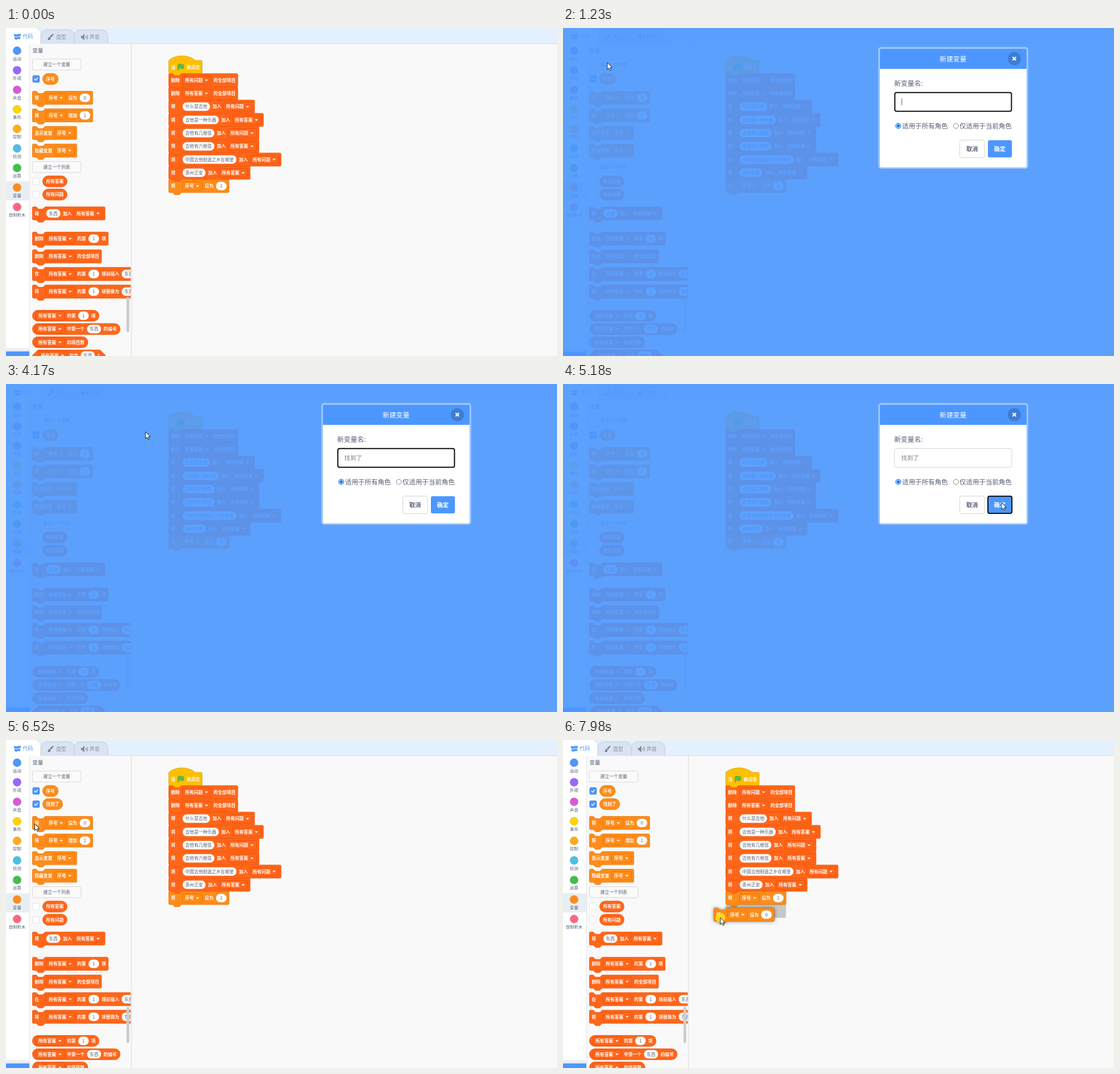
Write an HTML page with a canvas that moves like this. It is 970x578 px and loops after 8000 ms.

```html
<!DOCTYPE html>
<html lang="zh">
<head>
<meta charset="utf-8">
<style>
html, body { margin: 0; width: 100%; height: 100%; overflow: hidden; background: #f9f9f9; }
canvas { display: block; }
</style>
</head>
<body>
<canvas id="stage" width="970" height="578"></canvas>
<script>
const ctx = document.getElementById('stage').getContext('2d');
const CJK = '"Noto Sans CJK SC", "Noto Sans", sans-serif';
const MONO = '"Noto Sans Mono CJK SC", "Noto Sans CJK SC", monospace';
const LOOP = 8000;
const U = 0.4854;            // pixels per block unit
const FONT = 7.77, GAP = 4, ROW = 23.3;
const BLUE = '#4c97ff', INK = '#575e75';
const VAR = ['#ff8c1a', '#db6e00'], LIST = ['#ff661a', '#e64d00'], EVENT = ['#ffbf00', '#cc9900'];

// Moments of the story, in ms
const OPEN = 1230, COMMIT = 3650, CONFIRM = 5030, CLOSE = 5260, GRAB = 7310, DRAG = 7362;

// ---- drawing helpers ----
function setFont(size, weight = 400, family = CJK) {
  ctx.font = `${weight} ${size}px ${family}`;
}

function text(s, x, cy, size, color, { weight = 400, align = 'left', family = CJK } = {}) {
  setFont(size, weight, family);
  ctx.textAlign = align;
  ctx.fillStyle = color;
  ctx.fillText(s, x, cy + size * 0.37);
}

function paint(path, fill, stroke, width = 1) {
  if (fill) { ctx.fillStyle = fill; ctx.fill(path); }
  if (stroke) { ctx.strokeStyle = stroke; ctx.lineWidth = width; ctx.stroke(path); }
}

function rect(x, y, w, h, color) {
  ctx.fillStyle = color;
  ctx.fillRect(x, y, w, h);
}

function box(x, y, w, h, r, fill, stroke, width) {
  const p = new Path2D();
  p.roundRect(x, y, w, h, r);
  paint(p, fill, stroke, width);
}

function disc(x, y, r, fill, stroke, width) {
  const p = new Path2D();
  p.arc(x, y, r, 0, 7);
  paint(p, fill, stroke, width);
}

function icon(x, y, d, fill, stroke, width) {
  ctx.save();
  ctx.translate(x, y);
  paint(new Path2D(d), fill, stroke, width);
  ctx.restore();
}

function clipped(x, y, w, h, draw) {
  ctx.save();
  ctx.beginPath();
  ctx.rect(x, y, w, h);
  ctx.clip();
  draw();
  ctx.restore();
}

// ---- blocks ----
function shape(kind, w) {
  if (kind === 'pill') return `M20 4H${w - 20}a20 20 0 0 1 0 40H20a20 20 0 0 1 0-40z`;
  if (kind === 'hex') return `M20 4H${w - 20}l20 20l-20 20H20l-20-20z`;
  const top = kind === 'hat'
    ? 'M0 0c25-22 71-22 96 0'
    : 'M0 4a4 4 0 0 1 4-4H12c2 0 3 1 4 2l4 4c1 1 2 2 4 2h12c2 0 3-1 4-2l4-4c1-1 2-2 4-2';
  return `${top}H${w - 4}a4 4 0 0 1 4 4v40a4 4 0 0 1-4 4H48c-2 0-3 1-4 2l-4 4c-1 1-2 2-4 2` +
    'h-12c-2 0-3-1-4-2l-4-4c-1-1-2-2-4-2H4a4 4 0 0 1-4-4z';
}

function outline(kind, x, cy, w, fill, stroke, shadow) {
  ctx.save();
  ctx.translate(x, cy - ROW / 2);
  ctx.scale(U, U);
  if (shadow) { ctx.shadowColor = 'rgba(0,0,0,.55)'; ctx.shadowBlur = 6; }
  const p = new Path2D(shape(kind, w / U));
  paint(p, fill);
  ctx.shadowColor = 'transparent';
  paint(p, null, stroke, 1.4);
  ctx.restore();
}

// Spec tokens: plain label, [dropdown], (input), or ⚑ for the flag.
function block(x, cy, spec, [fill, stroke], kind = 'stack', shadow = false) {
  const pad = { pill: 6, hex: 10.5 }[kind] || GAP;
  setFont(FONT, 700);
  let cx = x + pad;
  const items = spec.split(' ').map((token, i) => {
    const type = '[(⚑'.includes(token[0]) ? token[0] : '';
    const label = type ? token.slice(1, -1) : token;
    const tw = ctx.measureText(label).width;
    const w = type === '[' ? tw + 19.6 : type === '(' ? Math.max(19.4, tw + 10) : type ? 11.65 : tw;
    if (i === 1 && kind === 'stack') cx = Math.max(cx, x + 24.1);
    const item = { type, label, x: cx, w };
    cx += w + GAP;
    return item;
  });
  outline(kind, x, cy, cx - GAP + pad - x, fill, stroke, shadow);
  for (const it of items) {
    if (it.type === '[') {
      box(it.x, cy - 7.75, it.w, 15.5, 2, null, stroke, 0.7);
      text(it.label, it.x + 4.6, cy, FONT, '#fff', { weight: 700 });
      icon(it.x + it.w - 8.3, cy, 'M-2.8-1.2h5.6l-2.8 3z', '#fff');
    } else if (it.type === '(') {
      box(it.x, cy - 7.75, it.w, 15.5, 7.75, '#fff', stroke, 0.5);
      text(it.label, it.x + it.w / 2, cy, FONT, INK, { weight: 500, align: 'center' });
    } else if (it.type) {
      icon(it.x, cy, 'M1.5-4.5c3-2 5 2 9 0v7c-4 2-6-2-9 0v3h-1v-10z', '#4cbf56', '#45993d', 0.6);
    } else {
      text(it.label, it.x, cy, FONT, '#fff', { weight: 700 });
    }
  }
}

// ---- editor ----
const CATEGORIES = [['运动', BLUE], ['外观', '#9966ff'], ['声音', '#d65cd6'], ['事件', '#ffd500'],
  ['控制', '#ffab19'], ['侦测', '#4cbfe6'], ['运算', '#40bf4a'], ['变量', '#ff8c1a'], ['自制积木', '#ff6680']];

const SCRIPT = ['删除 [所有问题] 的全部项目', '删除 [所有答案] 的全部项目',
  '将 (什么是吉他) 加入 [所有问题]', '将 (吉他是一种乐器) 加入 [所有答案]',
  '将 (吉他有几根弦) 加入 [所有问题]', '将 (吉他有六根弦) 加入 [所有答案]',
  '将 (中国吉他制造之乡在哪里) 加入 [所有问题]', '将 (贵州正安) 加入 [所有答案]'];

const SET_VAR = '将 [序号] 设为 (0)';
const PALETTE = [
  [123, SET_VAR, VAR], [154, '将 [序号] 增加 (1)', VAR],
  [185, '显示变量 [序号]', VAR], [216, '隐藏变量 [序号]', VAR],
  [326.7, '将 (东西) 加入 [所有答案]', LIST], [371.2, '删除 [所有答案] 的第 (1) 项', LIST],
  [402.5, '删除 [所有答案] 的全部项目', LIST],
  [433.5, '在 [所有答案] 的第 (1) 项前插入 (东西)', LIST],
  [464.5, '将 [所有答案] 的第 (1) 项替换为 (东西)', LIST],
  [507, '[所有答案] 的第 (1) 项', LIST, 'pill'], [530.5, '[所有答案] 中第一个 (东西) 的编号', LIST, 'pill'],
  [553.7, '[所有答案] 的项目数', LIST, 'pill'], [577, '[所有答案] 包含 (东西) ?', LIST, 'hex']];

const SCRIPT_X = 286.5, SCRIPT_Y = 92, PALETTE_X = 46.5;

function drawTabs() {
  rect(0, 0, 970, 27, '#e5f0ff');
  rect(41, 27, 929, 1, '#d3dbe6');
  box(120.5, 3, 59, 30, [11, 11, 0, 0], '#d9e3f2', '#c5cedc');
  box(61.5, 3, 59, 30, [11, 11, 0, 0], '#d9e3f2', '#c5cedc');
  box(-12, -1, 73, 34, [0, 11, 0, 0], '#fff', '#d3dbe6');
  text('代码', 29.5, 14.5, 9, BLUE, { weight: 500 });
  text('造型', 88, 15.5, 9, '#878d9e', { weight: 500 });
  text('声音', 147, 15.5, 9, '#878d9e', { weight: 500 });
  icon(14, 9.5, 'M0 1h2l1 1h2l1-1h6v4H6l-1 1H3L2 5H0zM2 6l1 1h2l1-1h5v4H6l-1 1H3l-1-1H1V6z', BLUE);
  icon(73, 10, 'M10 0l1 1-5 6-2-2zM3.5 6l2 2c0 3-3 3.5-5.5 2.5 2-1 1-4 3.5-4.5z', '#6d7387');
  icon(132, 10, 'M0 4h2l4-4v12l-4-4H0z', '#878d9e');
  icon(132, 10, 'M8 4q1.5 2 0 4M10 2q3 4 0 8', null, '#878d9e', 1.2);
}

function drawCategories() {
  rect(0, 27, 41, 551, '#fff');
  rect(0, 270, 41, 34, '#e9eef2');
  CATEGORIES.forEach(([name, color], i) => {
    const y = 40 + i * 34.44;
    disc(19.5, y, 7.2, color, 'rgba(0,0,0,.18)', 0.7);
    text(name, 19.5, y + 14, 7.4, INK, { align: 'center' });
  });
  const fade = ctx.createLinearGradient(0, 561, 0, 570);
  fade.addColorStop(0, '#fff');
  fade.addColorStop(1, '#dce6f4');
  rect(0, 561, 41, 9, fade);
  rect(0, 570, 41, 8, BLUE);
  rect(41, 28, 0.8, 550, '#e0e0e0');
}

function variable(y, name, colors, checked) {
  box(47, y - 6, 12, 12, 2, checked ? BLUE : '#fff', checked ? '#3d79cc' : '#d9d9d9', 0.7);
  if (checked) icon(53, y, 'M-3 0l2 2.2L3-2', null, '#fff', 1.4);
  block(64.5, y, name, colors, 'pill');
}

function paletteButton(cy, label) {
  box(PALETTE_X, cy - 9.7, 85.5, 19.4, 2, '#fafafa', '#d4d4d4', 0.9);
  text(label, 89.3, cy, 7.9, INK, { align: 'center' });
}

function drawPalette(created) {
  clipped(42, 28, 177.5, 550, () => {
    text('变量', PALETTE_X, 39, 9.5, INK, { weight: 500 });
    paletteButton(64.5, '建立一个变量');
    variable(89.8, '序号', VAR, true);
    if (created) {
      variable(113, '找到了', VAR, true);
      ctx.translate(0, 23.2);
    }
    paletteButton(245, '建立一个列表');
    variable(270.3, '所有答案', LIST, false);
    variable(293.5, '所有问题', LIST, false);
    for (const [y, spec, colors, kind] of PALETTE) block(PALETTE_X, y, spec, colors, kind);
  });
  box(212, created ? 470 : 474, 5, created ? 64 : 62, 2.5, '#cecdce');
  rect(220.3, 28, 1, 550, '#d9d9d9');
}

function drawWorkspace() {
  rect(0, 0, 970, 578, '#f9f9f9');
  for (let x = 232; x < 970; x += 19.4)
    for (let y = 46; y < 578; y += 19.4) rect(Math.round(x), Math.round(y), 1, 1, '#f1f1f1');
  block(SCRIPT_X, SCRIPT_Y - ROW, '当 ⚑ 被点击', EVENT, 'hat');
  SCRIPT.forEach((spec, i) => block(SCRIPT_X, SCRIPT_Y + i * ROW, spec, LIST));
  block(SCRIPT_X, SCRIPT_Y + 8 * ROW, '将 [序号] 设为 (1)', VAR);
}

// ---- dialog ----
const TYPING = [
  [2570, 'z', '在 自 子 做 总'], [2800, 'zh', '这 中国 至 只 真的'],
  [2940, 'zha', '扎 炸 咋 渣 乍'], [3100, 'zhao', '找 照 招 着 兆'],
  [3180, "zhao'd", '找到 找的 招待 找点 找打'], [3250, "zhao'da", '找打 招打 找大 照搭 找答'],
  [3330, "zhao'dao", '找到 照到 招到 找道 着道'], [3480, "zhao'dao'l", '找到了 找到啦 找到 照到 招到'],
  [3560, "zhao'dao'le", '找到了 照到了 找到 照到 招到']];

function drawCandidates([, letters, words]) {
  const size = 11.3;
  const spots = [];
  let x = 603;
  for (const word of words.split(' ')) {
    spots.push([x, word]);
    x += (word.length + 1) * size + 10;
  }
  const right = x + 39;
  box(596.5, 136.5, right - 597, 39, 0, '#fff', '#b9bec8');
  rect(597, 155, right - 598, 1, '#e2e5ea');
  text(letters, 603, 146, 12, '#1a63b8', { weight: 700, family: '"Liberation Sans", sans-serif' });
  rect(604 + ctx.measureText(letters).width, 140, 1, 13, '#e33');
  spots.forEach(([sx, word], i) =>
    text(`${i + 1}.${word}`, sx, 166, size, i ? '#1283dd' : '#f01818', { family: MONO }));
  icon(right - 34, 166, 'M2-3l-3 3 3 3', null, '#bbb');
  icon(right - 23, 166, 'M-2-3l3 3-3 3', null, '#e8502e', 1.5);
  icon(right - 10, 166, 'M-3-1.5l3 3 3-3', null, '#e8502e', 1.5);
  disc(right - 11, 147, 10.5, '#f47a55');
}

function drawDialog(t) {
  const onButton = t >= CONFIRM;
  const entry = TYPING.filter(([at]) => t >= at).pop();
  const composing = entry && t < COMMIT;
  rect(0, 0, 970, 578, 'rgba(76,151,255,.9)');
  box(555, 33.5, 264, 214.5, 5, 'rgba(255,255,255,.4)');
  box(558, 36.5, 258, 209, 2, '#fff');
  box(558, 36.5, 258, 35.5, [2, 2, 0, 0], BLUE);
  text('新建变量', 686.7, 55, 11.8, '#fff', { weight: 500, align: 'center' });
  disc(794.5, 54, 11.6, '#3f7dd1');
  icon(794.5, 54, 'M-3-3L3 3M3-3L-3 3', null, '#fff', 2.2);
  text('新变量名:', 583, 97.5, 11.8, INK);

  if (onButton) box(583.5, 113.5, 206.5, 33.5, 3, '#fff', '#d4d4d4');
  else box(584.2, 113.7, 205.3, 33, 3, '#fff', '#101010', 2);
  const value = composing ? entry[1].replaceAll("'", '') : entry ? '找到了' : '';
  text(value, 595.5, 130.3, 10.4, '#7b8090');
  const blinkOff = (t >= 1690 && t < 2240) || (t >= 4170 && t < 4700) || onButton;
  if (!blinkOff) rect(Math.round(595.5 + ctx.measureText(value).width), 124, 1, 12, '#666');

  disc(590.2, 172.5, 4.4, '#fff', '#0b72e0', 1.2);
  disc(590.2, 172.5, 2.7, '#0b72e0');
  text('适用于所有角色', 597, 172.7, 11.5, INK);
  disc(691.6, 172.5, 4.4, '#fff', '#777', 0.9);
  text('仅适用于当前角色', 698, 172.7, 11.5, INK);
  box(698.5, 197.5, 43.5, 31, 3, '#fff', '#d4d4d4');
  text('取消', 720.2, 213, 10.2, INK, { weight: 700, align: 'center' });
  box(748, 197.7, 42.3, 30.3, 3, BLUE, onButton && '#101010', 2);
  text('确定', 769, 213, 10.2, '#fff', { weight: 700, align: 'center' });
  if (composing) drawCandidates(entry);
}

// ---- pointer ----
const smooth = u => u * u * (3 - 2 * u);
const arrive = u => 1 - (1 - u) ** 1.6;
const settle = u => (1 - Math.exp(-2.07 * u)) / (1 - Math.exp(-2.07));

// Each move follows one Bézier curve, captured in a number of held steps.
const MOVES = [
  { start: 460, end: 930, steps: 7, ease: arrive, points: [[-8, 325], [10, 250], [60, 60], [82, 0], [78, 61]] },
  { start: 1540, end: 1690, steps: 3, ease: smooth, points: [[78, 61], [250, 99]] },
  { start: 4170, end: 4950, steps: 11, ease: smooth, points: [[250, 99], [185, -68], [640, -20], [870, 320], [772, 209]] },
  { start: 5890, end: 6660, steps: 11, ease: smooth, points: [[772, 209], [700, 256], [300, 40], [20, 108], [46, 168]] },
  { start: 6750, end: 7120, steps: 6, ease: smooth, points: [[46, 168], [42, 150], [52, 132], [51, 150]] },
  { start: DRAG, end: 7980, steps: 9, ease: settle, points: [[51, 150], [160, 238], [277, 313]] }];

function bezier(points, u) {
  if (points.length === 1) return points[0];
  return bezier(points.slice(1).map(([x, y], i) => {
    const [px, py] = points[i];
    return [px + (x - px) * u, py + (y - py) * u];
  }), u);
}

function pointerAt(t, lag = 0) {
  const { start, end, steps, ease, points } = MOVES.filter(m => t >= m.start).pop();
  const step = Math.min(steps, 1 + Math.floor((t - start) * (steps - 1) / (end - start) + 0.01));
  return bezier(points, ease((step - lag) / steps));
}

function drawPointer(t) {
  const [x, y] = pointerAt(t);
  const pressed = (t >= 1080 && t < OPEN) || (t >= CONFIRM && t < 5180) || t >= GRAB;
  if (pressed) disc(x, y, 8.7, 'rgba(250,230,30,.8)');
  icon(x, y, 'M0 0V12l2.8-2.5 2 4.2 1.9-.9-1.9-4h3.6z', '#fff', '#111', 0.9);
}

// The dragged copy trails the pointer; a grey slot shows once it is near enough to snap.
function drawDrag(t) {
  const [px, py] = pointerAt(t, 0.8);
  const x = PALETTE_X + px - 51, y = 146.2 + py - 147;
  const slotY = SCRIPT_Y + 9 * ROW;
  if (Math.hypot(x - SCRIPT_X, y - slotY) < 48 * U) outline('stack', SCRIPT_X, slotY, 106, 'rgba(0,0,0,.2)');
  block(x, y, SET_VAR, VAR, 'stack', true);
}

function frame() {
  const t = performance.now() % LOOP;
  drawWorkspace();
  drawPalette(t >= CLOSE);
  clipped(0, 0, 970, 28, drawTabs);
  drawCategories();
  if (t >= DRAG) drawDrag(t);
  if (t >= OPEN && t < CLOSE) drawDialog(t);
  if (t >= MOVES[0].start) drawPointer(t);
  requestAnimationFrame(frame);
}
frame();
</script>
</body>
</html>
```
